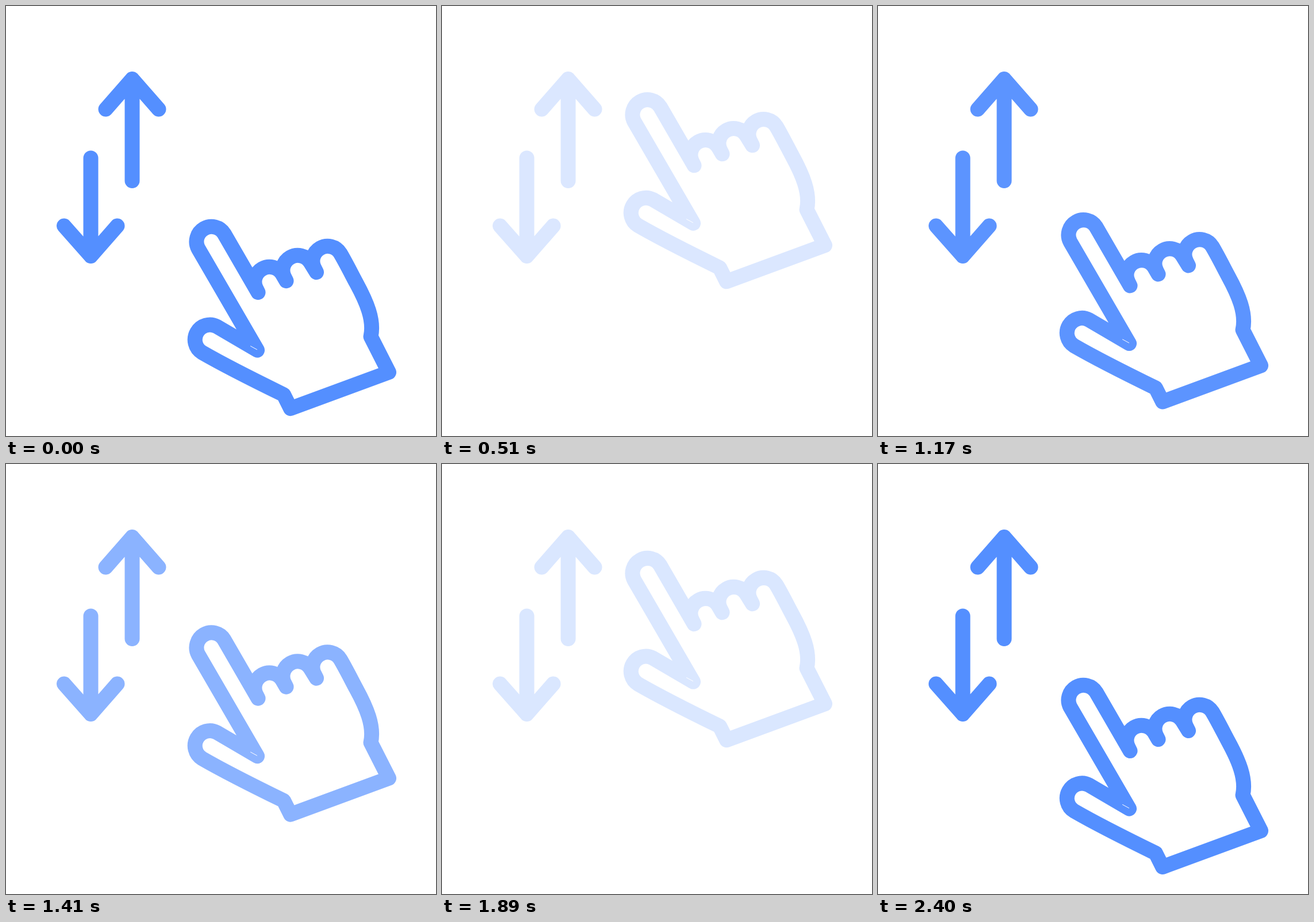
An HTML page for the animation above (2460 ms loop, 748 by 748 pixels).

```html
<!DOCTYPE html>
<html lang="en">
<head>
<meta charset="utf-8">
<title>Scroll gesture</title>
<style>
  html, body { margin: 0; height: 100%; overflow: hidden; background: #fff; }
  svg { display: block; width: 100vw; height: 100vh; }
</style>
</head>
<body>
<svg viewBox="0 0 748 748">
  <g id="icon" fill="none" stroke="#548fff" stroke-width="26" stroke-linecap="round" stroke-linejoin="round">
    <path d="M219.5 304V127M173.5 179.5L219.5 127L265.5 179.5"/>
    <path d="M147.5 264.5V435M101 382.5L147.5 435L193.5 382.5"/>
    <g id="hand">
      <path d="M438.5 499L379.5 397A26 26 0 0 0 334.5 423L437 599.5L367 558.5A26 26 0 0 0 341 603.5
        C380 626 440 656 483 677L495 701L666 638L634.5 576C641 547 627 515 609 482C602 469 591 447 581.5 431
        A26 26 0 0 0 536.5 457L540 464L529.5 447A26 26 0 0 0 484.5 473L487.5 479L480.5 467
        A26 26 0 0 0 435.5 493Z"/>
      <path d="M425.5 592.5L436.5 598.5" stroke="#fff" stroke-width="1"/>
    </g>
  </g>
</svg>
<script>
  const LOOP = 2460, LAST = 2400, STEP = 30;
  const PERIOD = 1201, PHASE = 2;
  const TRAVEL = 260, MIN_OPACITY = 0.08;
  const icon = document.getElementById('icon');
  const hand = document.getElementById('hand');

  function draw(now) {
    const time = Math.min(Math.floor(now % LOOP / STEP) * STEP, LAST);
    const cycle = (time + PHASE) / PERIOD % 1;
    const lift = 1 - Math.abs(1 - 2 * cycle);
    hand.setAttribute('transform', `translate(0 ${-TRAVEL * lift})`);
    icon.setAttribute('opacity', 1 - (1 - MIN_OPACITY) * lift);
  }

  const start = performance.now();
  function tick() {
    draw(performance.now() - start);
    requestAnimationFrame(tick);
  }
  tick();
</script>
</body>
</html>
```
